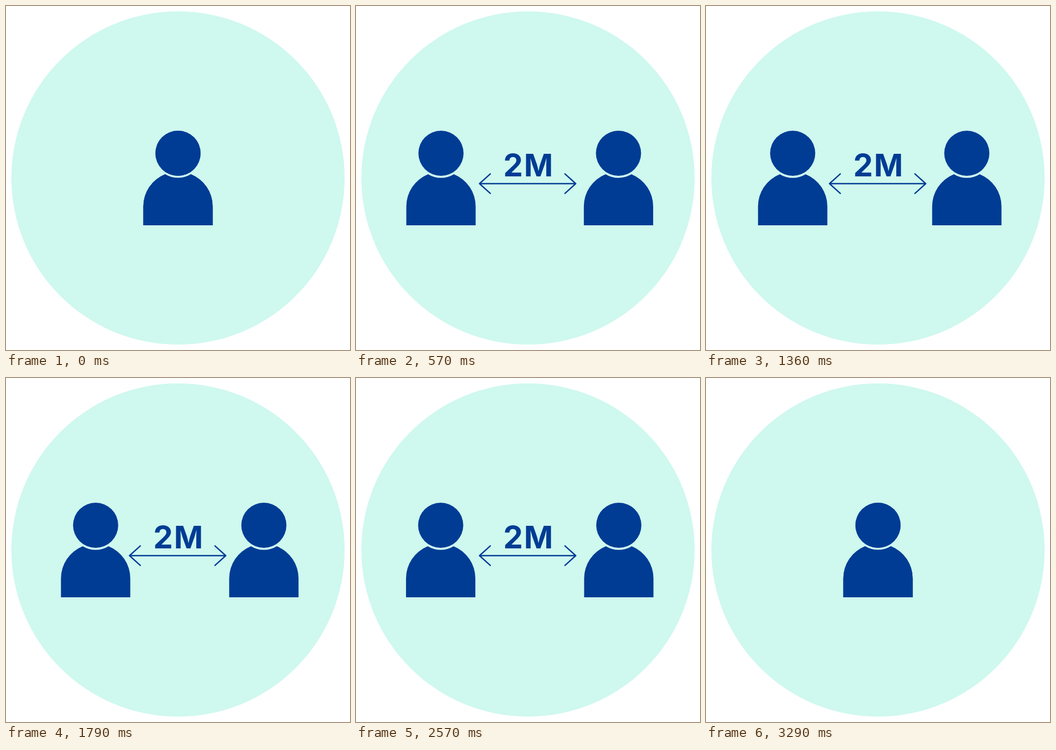
An HTML page for the animation above (3640 ms loop, 640 px wide and 640 px high).

```html
<!DOCTYPE html>
<html lang="en">
<head>
<meta charset="utf-8">
<title>Keep your distance</title>
<style>
  html, body { margin: 0; width: 100%; height: 100%; overflow: hidden; background: #fff; }
  svg { display: block; width: 100%; height: 100%; }
  text { font: 700 58px Inter, "Open Sans", sans-serif; letter-spacing: 2px; text-anchor: middle; }
</style>
</head>
<body>
<svg viewBox="0 0 640 640">
  <defs>
    <g id="person">
      <circle cy="274" r="42"/>
      <path d="M-64.5 408V373A64.5 64.5 0 0 1 -24 313A45.7 45.7 0 0 0 24 313A64.5 64.5 0 0 1 64.5 373V408Z"/>
    </g>
  </defs>
  <circle cx="320" cy="320" r="310" fill="#cff8ef"/>
  <g fill="#003c94">
    <g id="sign">
      <path id="arrow" fill="none" stroke="#003c94" stroke-width="2.5" stroke-linecap="round" stroke-linejoin="round"/>
      <text id="label" x="2" y="0">2M</text>
    </g>
    <use id="left" href="#person"/>
    <use id="right" href="#person"/>
  </g>
</svg>
<script>
const LOOP = 3640, STEP = LOOP / 51;
const MIDDLE = 320, LEFT = 157.5, RIGHT = 489;
const [sign, arrow, label, left, right] =
  ['sign', 'arrow', 'label', 'left', 'right'].map(id => document.getElementById(id));

const clamp = u => Math.min(1, Math.max(0, u));
const ease = u => u < 0.5 ? 4 * u ** 3 : 1 - 4 * (1 - u) ** 3;
const ramp = (t, start, length) => ease(clamp((t - start) / length));
const mix = (a, b, u) => a + (b - a) * u;

// Brief step towards each other halfway through the loop
const nudge = t => 13 / Math.cosh(0.0065 * (t - 1650));

function arrowPath(s) {
  const tip = 89.5 * s, barb = 69.5 * s;
  return `M${-tip} 330.5H${tip}` +
    [-1, 1].map(d => `M${d * barb} 312.3L${d * tip} 330.5L${d * barb} 348.7`).join('');
}

function draw(time) {
  const t = Math.floor(time % LOOP / STEP + 1e-6) * STEP;
  const apart = ramp(t, 0, 632) - ramp(t, 2668, 640);
  const size = ramp(t, 0, 579) - ramp(t, 2704, 579);
  const near = nudge(t) * apart;

  left.setAttribute('x', mix(MIDDLE, LEFT, apart) + near);
  right.setAttribute('x', mix(MIDDLE, RIGHT, apart) - near);

  sign.setAttribute('visibility', size > 0.005 ? 'visible' : 'hidden');
  sign.setAttribute('transform', 'translate(319.3 0)');
  arrow.setAttribute('d', arrowPath(size));
  label.setAttribute('transform', `translate(0 317.3) scale(${size})`);
}

const begin = performance.now();
function tick() {
  draw(performance.now() - begin);
  requestAnimationFrame(tick);
}
tick();
</script>
</body>
</html>
```
